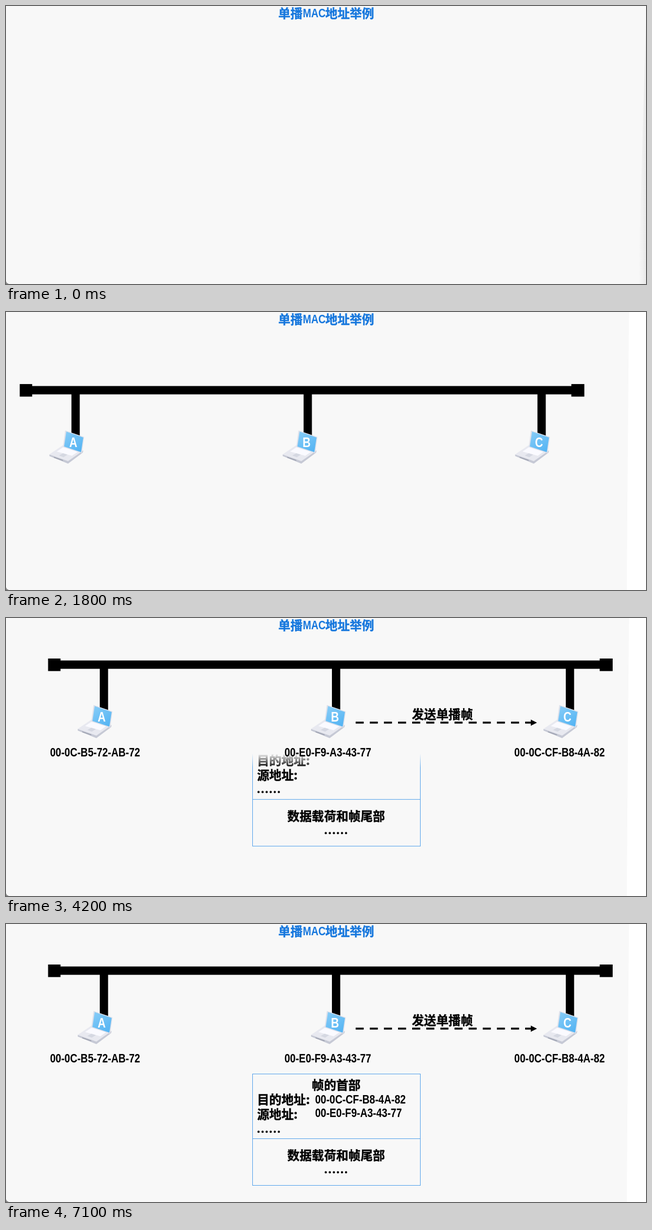
Write an HTML page with a canvas that moves like this. It is 1133 px wide and 494 px high and loops after 8000 ms.

```html
<!DOCTYPE html>
<html lang="zh-CN">
<head>
<meta charset="utf-8">
<style>
  html, body { margin: 0; height: 100%; overflow: hidden; background: #f8f8f8; }
  canvas { display: block; }
</style>
</head>
<body>
<canvas id="stage" width="1133" height="494"></canvas>
<script>
const ctx = document.getElementById('stage').getContext('2d');
const LOOP = 8000, STEP = 100, SIZE = 21.6;
const CJK = `bold ${SIZE}px "Noto Sans CJK SC", "Noto Sans CJK", sans-serif`;
const LATIN = `bold ${SIZE}px "Liberation Sans", Arial, sans-serif`;
const NARROW = 0.82;            // condensed Latin face
const BLUE = [90, 165, 235];
const HOSTS = [
  { name: 'A', dx: 0, mac: '00-0C-B5-72-AB-72', x: 78 },
  { name: 'B', dx: 413, mac: '00-E0-F9-A3-43-77', x: 493 },
  { name: 'C', dx: 824.5, mac: '00-0C-CF-B8-4A-82', x: 899.8 }
];

const clamp = v => Math.max(0, Math.min(1, v));
const decel = p => 1 - (1 - p) ** 2;
const smooth = p => p < 0.5 ? 2 * p * p : 1 - 2 * (1 - p) ** 2;

function poly(fill, ...p) {
  ctx.fillStyle = fill;
  ctx.beginPath();
  for (let i = 0; i < p.length; i += 2) ctx.lineTo(p[i], p[i + 1]);
  ctx.fill();
}

function rect(fill, x, y, w, h) {
  ctx.fillStyle = fill;
  ctx.fillRect(x, y, w, h);
}

// A hairline outline gives the heavier weight.
function cjk(str, x, y, fill = '#000', align = 'left') {
  ctx.font = CJK;
  ctx.textAlign = align;
  ctx.fillStyle = ctx.strokeStyle = fill;
  ctx.lineWidth = 0.4;
  ctx.fillText(str, x, y);
  ctx.strokeText(str, x, y);
}

function latin(str, x, y, fill = '#000', turn = 0) {
  ctx.save();
  ctx.translate(x, y);
  if (turn) {
    ctx.font = LATIN;
    const half = ctx.measureText(str).width * NARROW / 2;
    ctx.translate(half, -7.5);
    ctx.rotate(turn);
    ctx.translate(-half, 7.5);
  }
  ctx.scale(NARROW, 1);
  ctx.font = LATIN;
  ctx.textAlign = 'left';
  ctx.fillStyle = fill;
  ctx.fillText(str, 0, 0);
  ctx.restore();
}

// Colour that fades from clear at (x0,y0) to solid at (x1,y1).
function fade(x0, y0, x1, y1, rgb = [0, 0, 0]) {
  const g = ctx.createLinearGradient(x0, y0, x1, y1);
  g.addColorStop(0, `rgba(${rgb},0)`);
  g.addColorStop(1, `rgba(${rgb},1)`);
  return g;
}

function backdrop(t) {
  rect('#f8f8f8', 0, 0, 1133, 494);
  if (t < 200) {
    const g = ctx.createLinearGradient(1120, 0, 1133, 0);
    g.addColorStop(0, 'rgba(0,0,0,0)');
    g.addColorStop(1, 'rgba(0,0,0,.06)');
    poly(g, 1133, 30, 1133, 494, 1119, 494);
  } else {
    poly('#fff', 1103, 0, 1133, 0, 1133, 494, 1099, 494, 1100.5, 290);
  }
  poly('#888', 0, 489, 1.5, 492, 5, 494, 0, 494);
  const blue = '#1677dd';
  cjk('单播', 482, 20.5, blue);
  latin('MAC', 525.5, 20, blue);
  cjk('地址举例', 565.3, 20.5, blue);
}

function laptop({ name, dx }) {
  ctx.save();
  ctx.translate(dx, 0);
  poly('#c6c9d5', 127, 197, 160, 208, 187, 190, 186, 194, 160, 213.5, 127, 200);
  poly('#e8e9f0', 127, 197, 152, 180, 187, 190, 160, 209);
  poly('#fafaff', 140, 192, 154, 182.5, 180, 190.5, 167, 199.5);
  poly('#d5d8e2', 144, 199, 151, 195, 159, 197.5, 152, 202);
  poly('#9a9eac', 135, 201.5, 151, 207, 151, 208.5, 135, 203);
  poly('#dde1eb', 155, 154.5, 188.5, 166, 184.5, 195, 151, 184);
  const g = ctx.createLinearGradient(158, 158, 182, 194);
  g.addColorStop(0, '#84cbf7');
  g.addColorStop(1, '#52b3f3');
  poly(g, 157, 156.5, 187, 167, 183, 193, 153, 183);
  ctx.translate(169.3, 184.3);
  ctx.scale(NARROW, 1);
  ctx.font = 'bold 24px "Liberation Sans", Arial, sans-serif';
  ctx.textAlign = 'center';
  ctx.fillStyle = '#fff';
  ctx.fillText(name, 0, 0);
  ctx.restore();
}

// Swings in while turning, overshoots, then settles.
function poseNetwork(t) {
  const ms = t < 1500 ? 100 + (t - 1100) * 1.2425 : 597 + (t - 1500) * 0.9075;
  const e = decel(clamp(ms / 800));
  const back = 1 - clamp((ms - 800) / 200) ** 2;
  const x = ms < 800 ? 0.4 - 0.45 * e : -0.05 * back;
  const y = ms < 800 ? -0.4 + 0.5 * e : 0.1 * back;
  ctx.globalAlpha = e;
  ctx.translate(574 + x * 1140, 142.5 + y * 637);
  ctx.rotate(-Math.PI / 2 * (1 - e));
  ctx.translate(-574, -142.5);
}

function bus() {
  rect('#000', 85, 75.5, 977, 14.8);
  rect('#000', 74.5, 72, 22, 22.3);
  rect('#000', 1051, 72, 23, 22.3);
  for (const x of [166, 577, 991]) rect('#000', x, 83, 14.7, 85);
}

// Each character hops and rocks, 50 ms after its neighbour.
function wave(str, x, y, ms) {
  [...str].forEach((ch, i) => {
    const local = Math.max(0, Math.min(500, ms - 50 * i));
    const rise = smooth(1 - Math.abs(local - 250) / 250);
    const q = local / 125;
    const rock = q < 1 ? q : q < 3 ? 2 - q : q - 4;
    latin(ch, x, y - 45.9 * rise, '#000', rock * 25 * Math.PI / 180);
    ctx.font = LATIN;
    x += ctx.measureText(ch).width * NARROW;
  });
}

function addresses(t) {
  const p = clamp(0.11 + (t - 2400) * 0.001115);
  const waves = { B: (t - 6080) * 1.27, C: 775 + (t - 5500) * 1.08 };
  ctx.globalAlpha = p;
  for (const { name, mac, x } of HOSTS) {
    const y = 246.3 - 63.7 * (1 - p), ms = waves[name];
    if (ms > 0 && ms < 1300) wave(mac, x, y, ms);
    else latin(mac, x, y);
  }
  ctx.globalAlpha = 1;
}

function arrow(t) {
  const p = clamp(0.867 + (t - 3600) * 0.00222);
  const front = 619 + 361 * p;
  const ink = fade(front, 0, front - 40, 0);
  cjk('发送单播帧', 718.5, 179, ink);
  for (let x = 619; x < 930; x += 25) rect(ink, x, 184.2, Math.min(14.3, 931 - x), 3.4);
  poly(ink, 929, 180.5, 940, 186, 929, 191.5);
}

function table(t) {
  const p = clamp(0.527 + (t - 4100) * 0.00209);
  const dy = -224 * (1 - p);
  const ink = fade(0, 241, 0, 266);
  ctx.strokeStyle = fade(0, 241, 0, 266, BLUE);
  ctx.lineWidth = 1;
  ctx.strokeRect(436.5, 266.5 + dy, 297, 198);
  ctx.beginPath();
  ctx.moveTo(436.5, 381.5 + dy);
  ctx.lineTo(733.5, 381.5 + dy);
  ctx.stroke();
  cjk('帧的首部', 584.5, 293.7 + dy, ink, 'center');
  cjk('目的地址:', 444.5, 319.7 + dy, ink);
  cjk('源地址:', 444.5, 345.7 + dy, ink);
  cjk('……', 443.5, 376.5 + dy, ink);
  cjk('数据载荷和帧尾部', 584.5, 418.7 + dy, ink, 'center');
  cjk('……', 584, 448.8 + dy, ink, 'center');
}

function draw(t) {
  backdrop(t);
  if (t >= 3800) table(t);
  if (t >= 1100) {
    ctx.save();
    if (t < 2000) poseNetwork(t);
    bus();
    if (t >= 2400) addresses(t);
    HOSTS.forEach(laptop);
    ctx.restore();
  }
  if (t >= 3300) arrow(t);
  if (t >= 6000) latin(HOSTS[2].mac, 547.2, 319);
  if (t >= 7100) latin(HOSTS[1].mac, 547.2, 343);
}

function tick() {
  draw(Math.floor(performance.now() % LOOP / STEP) * STEP);
  requestAnimationFrame(tick);
}
tick();
</script>
</body>
</html>
```
